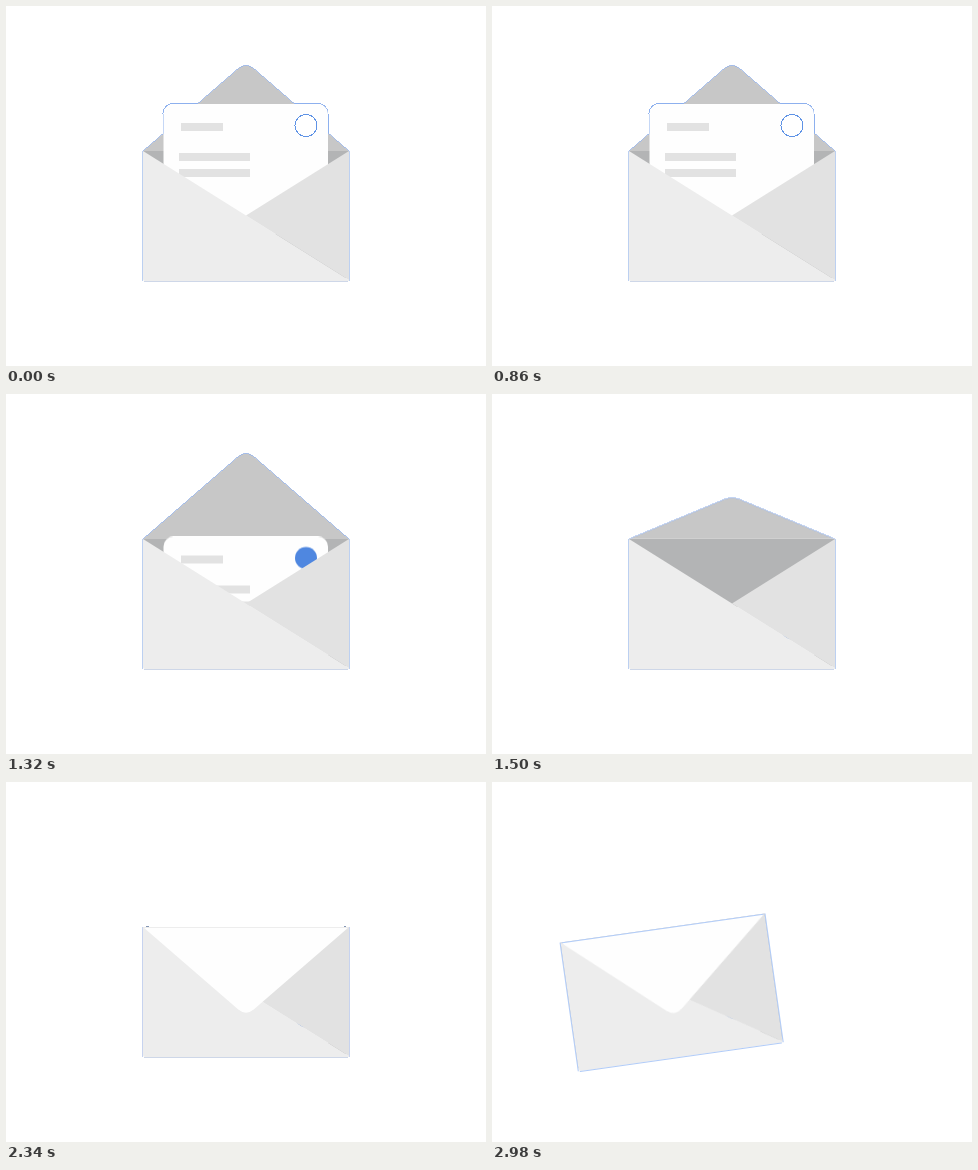
An HTML page without scripts for the animation above (3 s loop, 480 by 360 pixels).

```html
<!DOCTYPE html>
<html lang="en">
<head>
<meta charset="utf-8">
<title>Sending a letter</title>
<style>
  html, body { margin: 0; width: 100%; height: 100%; overflow: hidden; background: #fff; }
  svg { display: block; width: 100vw; height: 100vh; }

  .mail, .card, .open, .shut, .seal, .top, .side, .base, .nick {
    animation: 3s linear infinite;
  }
  .line { fill: none; stroke-width: 1; shape-rendering: crispEdges; vector-effect: non-scaling-stroke; }
  .blue { stroke: #8db0ee; }
  .thin { stroke-width: .7; }

  .mail { transform-origin: 240px 210px; animation-name: windup; }
  .card { animation-name: drop; }
  .open, .shut { transform-origin: 240px 145px; }
  .open { animation-name: fold; }
  .shut { animation-name: cover; }
  .seal { animation-name: ink; }
  .top { animation-name: rim; }
  .side { animation-name: sides; }
  .base { animation-name: base; }
  .nick { animation-name: nick; }

  @keyframes windup {
    0%, 90% { transform: none; animation-timing-function: cubic-bezier(.33, 0, .4, 1); }
    100% { transform: translate(-60.6px, .4px) rotate(-8.1deg); }
  }
  @keyframes drop {
    0%, 33.33% { transform: translateY(0); animation-timing-function: ease-in-out; }
    37.67% { transform: translateY(-6px); animation-timing-function: cubic-bezier(.52, 0, .61, 1); }
    50.33%, 100% { transform: translateY(115px); }
  }
  @keyframes fold {
    0%, 46.67% { transform: scaleY(1); animation-timing-function: ease-in; }
    51.67%, 100% { transform: scaleY(0); }
  }
  @keyframes cover {
    0%, 51.67% { transform: scaleY(0); animation-timing-function: ease-out; }
    56.67%, 100% { transform: scaleY(1); }
  }
  @keyframes ink {
    0%, 39.5% { fill: #fff; stroke: #5f93e6; shape-rendering: crispEdges; }
    39.51%, 100% { fill: #4f87e0; stroke: transparent; shape-rendering: auto; }
  }
  @keyframes rim {
    0%, 51.66% { stroke: transparent; }
    51.67%, 90% { stroke: #e6e6e6; }
    90.5%, 100% { stroke: #8fb5f5; }
  }
  @keyframes sides {
    0%, 51.66% { stroke: #a0bdec; }
    51.67%, 90% { stroke: #b0c0e8; }
    90.5%, 100% { stroke: #8fb5f5; }
  }
  @keyframes base {
    0%, 90% { stroke: #b9c6de; }
    90.5%, 100% { stroke: #8fb5f5; }
  }
  @keyframes nick {
    0%, 56.66% { opacity: 0; }
    56.67%, 90% { opacity: 1; }
    90.01%, 100% { opacity: 0; }
  }
</style>
</head>
<body>
<svg viewBox="0 0 480 360">
  <defs>
    <clipPath id="pocket"><rect width="480" height="268"/></clipPath>
  </defs>
  <g class="mail">
    <!-- card rim, visible only outside the open flap -->
    <g clip-path="url(#pocket)">
      <g class="card">
        <rect class="line blue" x="157" y="97.5" width="165" height="130" rx="10"/>
      </g>
    </g>

    <!-- open flap and inside of the envelope -->
    <g class="open">
      <path fill="#c7c7c7" d="M137 145L232 62.7Q240 55.8 248 62.7L343 145Z"/>
      <path class="line blue thin" d="M137 145L232 62.7Q240 55.8 248 62.7L343 145"/>
    </g>
    <path fill="#b3b4b5" d="M137 145H343V272H137Z"/>

    <g clip-path="url(#pocket)">
      <g class="card">
        <rect x="157.5" y="98" width="164.5" height="130" rx="10" fill="#fefefe"/>
        <g fill="#e2e2e2">
          <rect x="175" y="117" width="42" height="8"/>
          <rect x="173" y="147" width="71" height="8"/>
          <rect x="173" y="163" width="71" height="8"/>
        </g>
        <circle class="seal" cx="300" cy="119.5" r="11"/>
      </g>
    </g>

    <!-- front -->
    <path fill="#ededed" d="M137 145L343 274V275H139Q137 275 137 273Z"/>
    <path fill="#e2e2e2" d="M343 145L240 209.5L343 274Z"/>
    <path class="shut" fill="#fefefe" d="M137 145L232 227.3Q240 234.2 248 227.3L343 145Z"/>

    <path class="line top thin" d="M138 145.5H342"/>
    <path class="line base thin" d="M138 275.5H342"/>
    <path class="line side thin" d="M136.5 145V273.5L138 275M343.5 145V273.5L342 275"/>
    <path class="line nick" stroke="#8496b4" d="M140 144.5H143M338 144.5H340"/>
  </g>
</svg>
</body>
</html>
```
